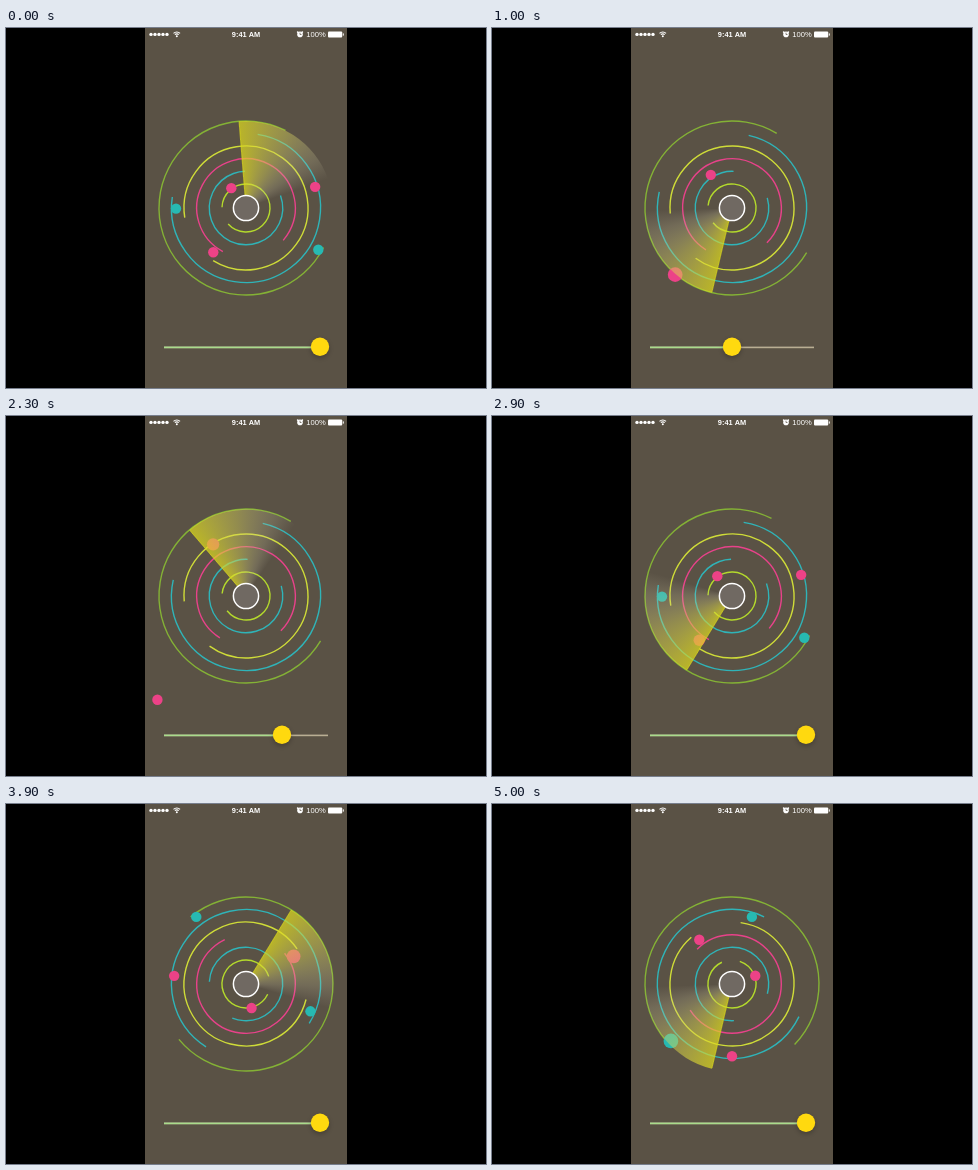
An HTML page with a canvas for the animation above (5100 ms loop, 480 by 360 pixels).

```html
<!DOCTYPE html>
<html>
<head>
<meta charset="utf-8">
<style>
  html, body { margin: 0; width: 480px; height: 360px; overflow: hidden; background: #000; }
  canvas { display: block; }
</style>
</head>
<body>
<canvas id="stage" width="480" height="360"></canvas>
<script>
const ctx = document.getElementById('stage').getContext('2d');
const LOOP = 5100, STEP = 100;
const CX = 240, CY = 180, PHONE_X = 139, PHONE_W = 202;
const TEAL = '#27b9b2', PINK = '#ec4287', YELLOW = '#ffd90f';

// Angles are degrees, counterclockwise from east.
const rings = [
  { r: 87, gap: [-27, 63], color: '#84b235' },
  { r: 74.5, gap: [81, 171.5], color: '#2fb4b8' },
  { r: 62, gap: [189, 238], color: '#cfdc38' },
  { r: 49.3, gap: [242, 319], color: '#e8428a' },
  { r: 36.7, gap: [20, 91.5], color: '#2fb4b8' },
  { r: 24, gap: [178, 222], color: '#b4da2c' },
];
const balls = [
  { r: 83.5, angle: -30, color: TEAL },
  { r: 72.3, angle: 17, color: PINK },
  { r: 55, angle: 233.5, color: PINK },
  { r: 24.7, angle: 126.5, color: PINK },
  { r: 70, angle: 180.5, color: TEAL },
];

// [time, value] keys
const spinKeys = [[0, 0], [700, 0], [1400, -10], [1800, -10], [2300, -4], [2600, 0],
  [2900, 0], [3500, 142], [3750, 172], [4300, 51], [5000, -107]];
const spreadKeys = [[0, 1], [750, 1], [1300, 2.75], [1500, 3.2], [1900, 3.25],
  [2200, 2.96], [2300, 2.48], [2700, 1], [5000, 1]];
const knobKeys = [[0, 314], [700, 314], [1300, 166], [1800, 166], [2300, 276],
  [2500, 314], [5000, 314]];

// Smooth curve through the keys; flat at turning points.
function curve(keys, t) {
  const slope = i => (keys[i + 1][1] - keys[i][1]) / (keys[i + 1][0] - keys[i][0]);
  const tangent = i => {
    if (i <= 0 || i >= keys.length - 1) return 0;
    const a = slope(i - 1), b = slope(i);
    return a * b > 0 ? 2 * a * b / (a + b) : 0;
  };
  if (t <= keys[0][0]) return keys[0][1];
  const i = keys.findIndex(k => k[0] >= t) - 1;
  if (i < 0) return keys[keys.length - 1][1];
  const [t0, v0] = keys[i], [t1, v1] = keys[i + 1];
  const d = t1 - t0, u = (t - t0) / d, w = 1 - u;
  return v0 * w * w * (1 + 2 * u) + v1 * u * u * (3 - 2 * u) +
    d * u * w * (tangent(i) * w - tangent(i + 1) * u);
}

const rad = deg => -deg * Math.PI / 180;
const sweepAngle = t => 94.6 + 0.18 * Math.max(0, t - 100);
const wrap = deg => ((deg + 180) % 360 + 360) % 360 - 180;

function disc(x, y, r, color) {
  ctx.fillStyle = color;
  ctx.beginPath();
  ctx.arc(x, y, r, 0, 2 * Math.PI);
  ctx.fill();
}

function line(x0, x1, y, color) {
  ctx.fillStyle = color;
  ctx.fillRect(x0, y - 0.8, x1 - x0, 1.6);
}

// A ball swells briefly after the beam's edge meets it.
function swell(ball, t) {
  const offset = s => wrap(ball.angle + curve(spinKeys, s) - sweepAngle(s));
  for (let age = 0; age < 300; age += 10) {
    const now = offset(t - age), before = offset(t - age - 10);
    if (t - age > 100 && now * before <= 0 && Math.abs(now) < 90)
      return 2.2 * Math.sin(Math.PI * (age + 5) / 310);
  }
  return 0;
}

function drawStatusBar() {
  const white = '#fff';
  for (let i = 0; i < 5; i++) disc(145 + i * 4, 6.4, 1.7, white);

  ctx.strokeStyle = white;
  ctx.lineWidth = 1.1;
  for (const r of [2.7, 4.6]) {
    ctx.beginPath();
    ctx.arc(170.8, 8.6, r, -Math.PI * 0.75, -Math.PI * 0.25);
    ctx.stroke();
  }
  disc(170.8, 8.3, 1, white);

  ctx.fillStyle = white;
  ctx.textBaseline = 'alphabetic';
  ctx.textAlign = 'center';
  ctx.font = 'bold 7.4px "Liberation Sans", Arial, sans-serif';
  ctx.fillText('9:41 AM', 240, 9);
  ctx.font = '7.6px "Liberation Sans", Arial, sans-serif';
  ctx.fillText('100%', 310, 9);

  disc(294, 6.4, 2.8, white);
  disc(291.7, 4.1, 0.9, white);
  disc(296.3, 4.1, 0.9, white);
  ctx.strokeStyle = '#5a5245';
  ctx.lineWidth = 0.7;
  ctx.beginPath();
  ctx.moveTo(294, 4.7);
  ctx.lineTo(294, 6.5);
  ctx.lineTo(295.5, 6.5);
  ctx.stroke();

  ctx.fillStyle = white;
  ctx.beginPath();
  ctx.roundRect(322, 3.6, 14.2, 5.8, 1);
  ctx.fill();
  ctx.fillRect(336.8, 5.4, 1, 2.2);
}

function drawSweep(t) {
  const lead = rad(sweepAngle(t)), span = 75 / 360;
  const beam = ctx.createConicGradient(lead, CX, CY);
  beam.addColorStop(0, 'rgba(222,218,30,0.72)');
  beam.addColorStop(span * 0.45, 'rgba(215,210,90,0.45)');
  beam.addColorStop(span * 0.8, 'rgba(210,205,160,0.2)');
  beam.addColorStop(span, 'rgba(210,205,180,0)');
  beam.addColorStop(1, 'rgba(210,205,180,0)');
  ctx.fillStyle = beam;
  ctx.beginPath();
  ctx.moveTo(CX, CY);
  ctx.arc(CX, CY, 87, lead, lead + span * 2 * Math.PI);
  ctx.fill();

  ctx.strokeStyle = 'rgba(215,212,30,0.75)';
  ctx.lineWidth = 1;
  ctx.beginPath();
  ctx.moveTo(CX, CY);
  ctx.lineTo(CX + 86.5 * Math.cos(lead), CY + 86.5 * Math.sin(lead));
  ctx.stroke();
}

function drawRadar(t) {
  const spin = curve(spinKeys, t), spread = curve(spreadKeys, t);
  ctx.lineWidth = 1.4;
  for (const { r, gap, color } of rings) {
    ctx.strokeStyle = color;
    ctx.beginPath();
    ctx.arc(CX, CY, r, rad(gap[0] + spin), rad(gap[1] + spin - 360), false);
    ctx.stroke();
  }
  for (const ball of balls) {
    const a = rad(ball.angle + spin), r = ball.r * spread;
    disc(CX + r * Math.cos(a), CY + r * Math.sin(a), 5.2 + swell(ball, t), ball.color);
  }
  drawSweep(t);

  disc(CX, CY, 12.6, '#706962');
  ctx.strokeStyle = '#fff';
  ctx.lineWidth = 1.5;
  ctx.stroke();
}

function drawSlider(t) {
  const x = curve(knobKeys, t);
  line(158, 322, 319.4, '#b9ae93');
  line(158, x, 319.4, '#a9dc8c');
  ctx.save();
  ctx.shadowColor = 'rgba(0,0,0,0.25)';
  ctx.shadowBlur = 5;
  ctx.shadowOffsetY = 2;
  disc(x, 318.8, 9.2, YELLOW);
  ctx.restore();
}

function draw(t) {
  ctx.fillStyle = '#000';
  ctx.fillRect(0, 0, 480, 360);
  ctx.save();
  ctx.beginPath();
  ctx.rect(PHONE_X, 0, PHONE_W, 360);
  ctx.clip();
  ctx.fillStyle = '#5a5245';
  ctx.fillRect(PHONE_X, 0, PHONE_W, 360);
  drawStatusBar();
  drawRadar(t);
  drawSlider(t);
  ctx.restore();
}

const start = performance.now();
function tick() {
  const t = (performance.now() - start) % LOOP;
  draw(Math.floor(t / STEP) * STEP);
  requestAnimationFrame(tick);
}
tick();
</script>
</body>
</html>
```
